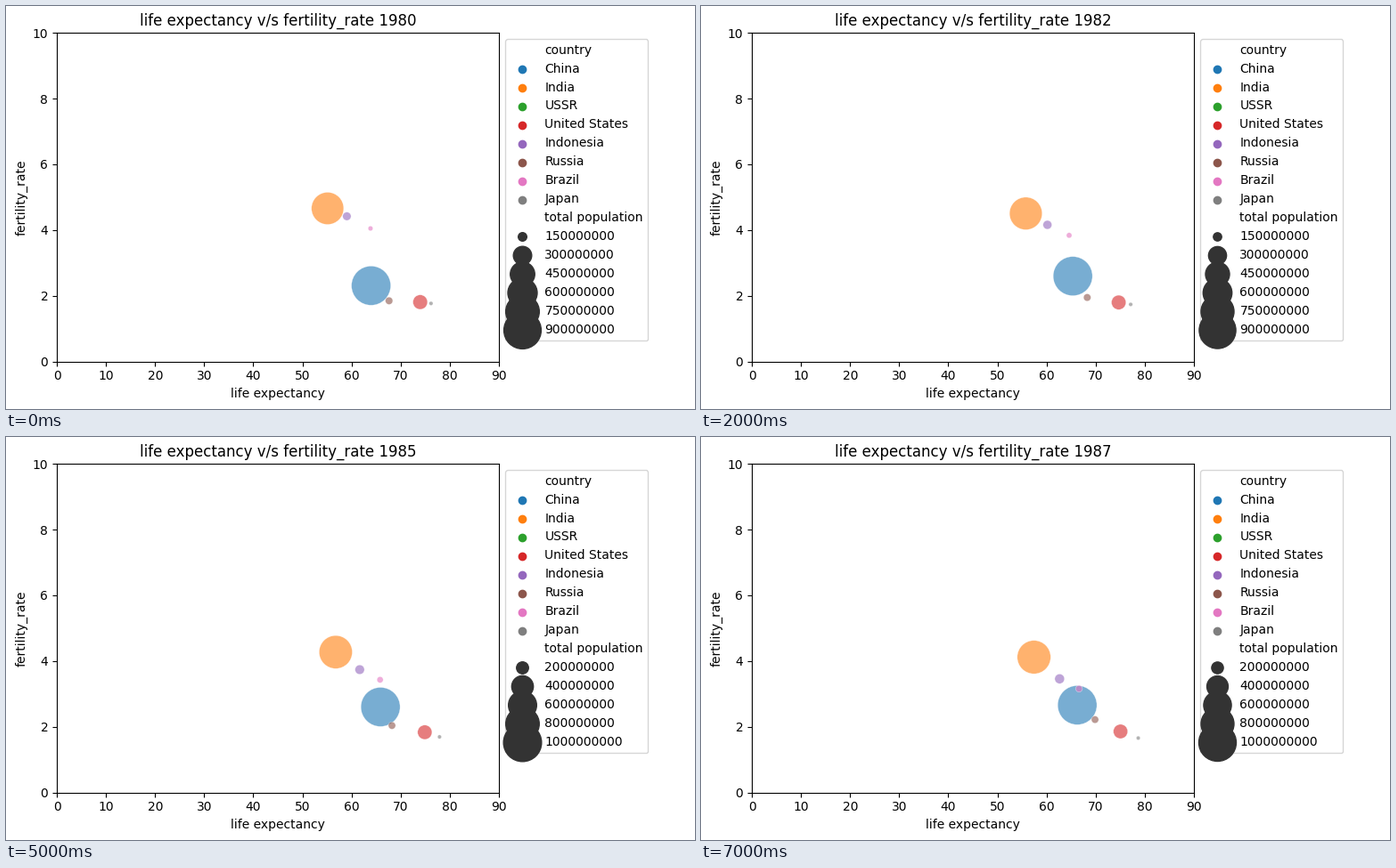
Recreate the animation shown at these times as a matplotlib script. Size 773 by 453 pixels, loop 8 s.

```python
import numpy as np
import matplotlib.pyplot as plt
from matplotlib.animation import FuncAnimation

WIDTH, HEIGHT, DPI = 773, 453, 100
PLOT_WIDTH, PLOT_HEIGHT, MARGIN = 496, 369.6, 10
FIRST_YEAR, YEARS = 1980, 8

LEGEND_NAMES = ["China", "India", "USSR", "United States",
                "Indonesia", "Russia", "Brazil", "Japan"]
COLORS = dict(zip(LEGEND_NAMES, plt.get_cmap("tab10").colors))

# population in millions: first year and yearly growth
POPULATION = {
    "China": (981.2, 14.5),
    "India": (697, 17.6),
    "United States": (227.2, 2.15),
    "Indonesia": (147.5, 3.5),
    "Russia": (139, 1),
    "Brazil": (121, 2.85),
    "Japan": (116.8, 0.77),
}
# turning points of each path: year, life expectancy, fertility rate
PATHS = {
    "China": [(0, 63.97, 2.31), (1, 64.25, 2.7), (2, 65.34, 2.6),
              (3, 65.52, 2.55), (7, 66.25, 2.66)],
    "India": [(0, 55.11, 4.66), (7, 57.43, 4.12)],
    "United States": [(0, 73.97, 1.81), (2, 74.68, 1.8), (7, 75.05, 1.86)],
    "Indonesia": [(0, 59.04, 4.42), (2, 60.17, 4.16), (7, 62.65, 3.46)],
    "Russia": [(0, 67.63, 1.85), (2, 68.27, 1.95), (3, 68.04, 2.08),
               (5, 68.22, 2.04), (7, 69.86, 2.22)],
    "Brazil": [(0, 63.85, 4.05), (2, 64.59, 3.84), (7, 66.61, 3.16)],
    "Japan": [(0, 76.17, 1.77), (2, 77.12, 1.74), (3, 77.14, 1.73),
              (7, 78.66, 1.66)],
}

fig = plt.figure(figsize=(WIDTH / DPI, HEIGHT / DPI), dpi=DPI)
ax = fig.add_axes([0, 0, PLOT_WIDTH / WIDTH, PLOT_HEIGHT / HEIGHT])


def label_axes(year):
    ax.set(xlim=(0, 90), ylim=(0, 10),
           xlabel="life expectancy", ylabel="fertility_rate",
           title=f"life expectancy v/s fertility_rate {FIRST_YEAR + year}")


def place_axes():
    """Leave an even margin left of and below the axis labels."""
    label_axes(0)
    fig.canvas.draw()
    box = ax.get_tightbbox()
    ax.set_position([(MARGIN - box.x0) / WIDTH, (MARGIN - box.y0) / HEIGHT,
                     PLOT_WIDTH / WIDTH, PLOT_HEIGHT / HEIGHT])


def position(name, year):
    years, life, fertility = zip(*PATHS[name])
    return np.interp(year, years, life), np.interp(year, years, fertility)


def draw_legend(area, step, top):
    def key(label, color, **style):
        return ax.scatter([], [], color=color, label=label, **style)

    handles = [key("country", "w", alpha=0)]
    handles += [key(name, [COLORS[name]]) for name in LEGEND_NAMES]
    handles.append(key("total population", "w", alpha=0))
    handles += [key(f"{size}000000", "0.2", s=area(size))
                for size in range(step, top + 1, step)]
    ax.legend(handles=handles, bbox_to_anchor=(1, 1), loc="upper left")


def draw(year):
    ax.clear()
    people = np.array([start + growth * year
                       for start, growth in POPULATION.values()])
    low, high = people.min(), people.max()

    def area(size):
        return 10 + 990 * (size - low) / (high - low)

    areas = area(people)
    x, y = zip(*(position(name, year) for name in POPULATION))
    ax.scatter(x, y, s=areas, c=[COLORS[name] for name in POPULATION],
               alpha=0.6, edgecolors="w",
               linewidths=0.08 * np.sqrt(np.percentile(areas, 10)))
    label_axes(year)
    # wider legend steps once the largest population is well past a billion
    if high < 1020:
        draw_legend(area, 150, 900)
    else:
        draw_legend(area, 200, 1000)
    return []


place_axes()
anim = FuncAnimation(fig, draw, frames=YEARS, interval=1000,
                     init_func=lambda: draw(0), repeat=True, repeat_delay=0)
plt.show()
```
